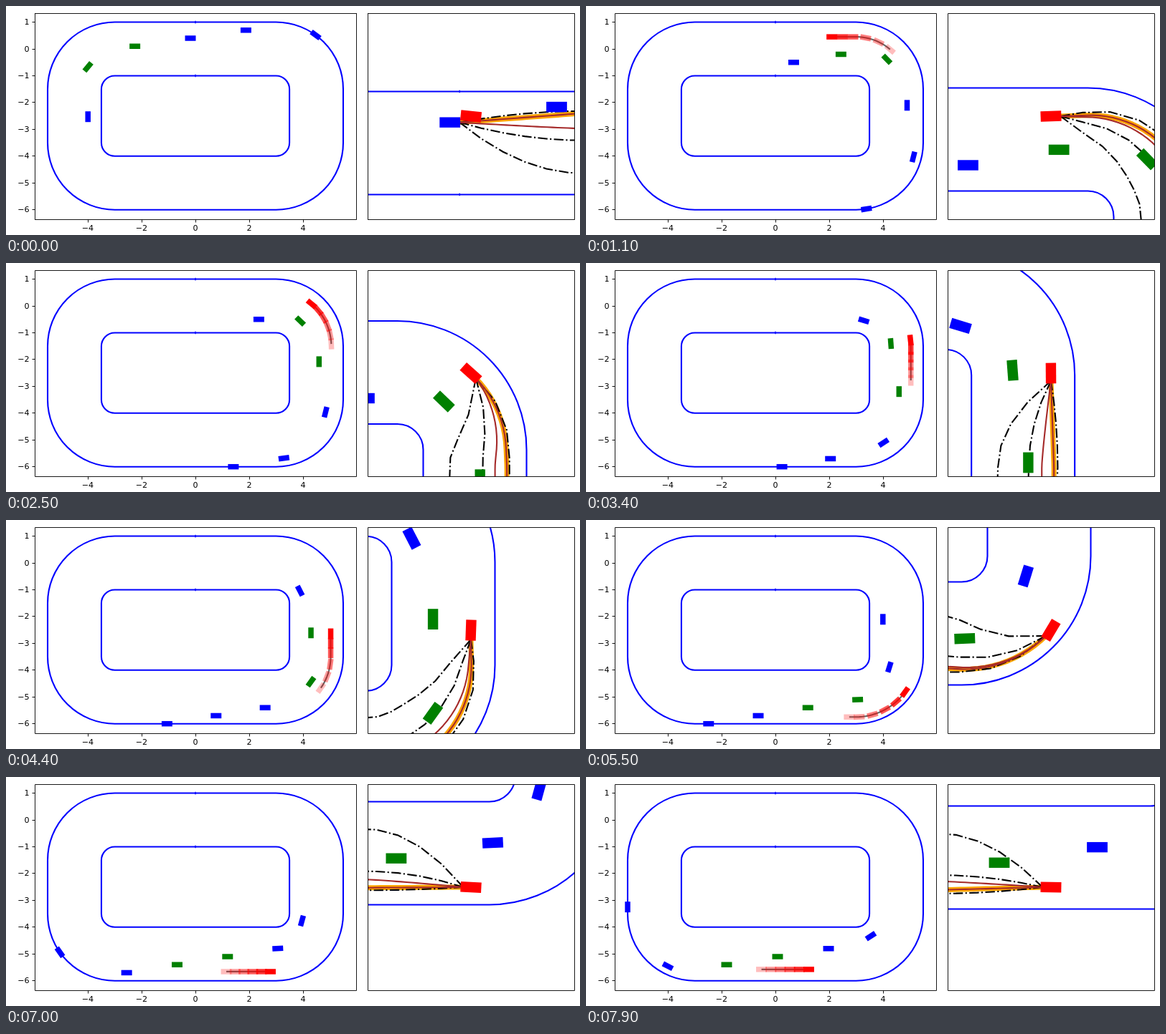
An HTML page with a canvas for the animation above (8000 ms loop, 800 by 320 pixels).

```html
<!DOCTYPE html>
<html lang="en">
<head>
<meta charset="utf-8">
<title>Track planner</title>
<style>
html, body { margin: 0; width: 800px; height: 320px; overflow: hidden; background: #fff; }
canvas { display: block; }
</style>
</head>
<body>
<canvas id="stage" width="800" height="320"></canvas>
<script>
const ctx = document.getElementById('stage').getContext('2d');
const QUARTER = Math.PI / 2, BEND = 1.5 * QUARTER, HALF = 8 + 2 * BEND;

// step, progress, lane offset, lag, plan length, tilt (deg), then five target offsets
const keys = [
  [0, .22, .52, .17, 2.09, -6, .62, .58, .28, .05, -.59],
  [11, 2.285, .451, .185, 1.96, 2, .66, .53, .39, .12, -.47],
  [25, 4.146, .558, .1, 1.25, 2, .67, .62, .39, .15, -.49],
  [44, 6.68, .535, .18, 1.77, -2, .68, .57, .37, .11, -.47],
  [55, 8.396, .748, .1, 1.67, 9, .75, .66, .62, .42, -.4],
  [70, 10.07, .66, .147, 1.64, -3, .72, .67, .51, .35, -.47],
  [79, 11.632, .576, .16, 1.76, -1, .7, .63, .46, .34, -.47]
];

// Smooth interpolation of every column at step k
function stateAt(k) {
  const last = keys.length - 1;
  let i = 0;
  while (i < last - 1 && keys[i + 1][0] <= k) i++;
  const a = keys[i], b = keys[i + 1], h = b[0] - a[0], u = (k - a[0]) / h;
  const slope = (j, c) => {
    const p = keys[Math.max(j - 1, 0)], n = keys[Math.min(j + 1, last)];
    return (n[c] - p[c]) / (n[0] - p[0]);
  };
  return a.map((v, c) => {
    const w = u * u * (3 - 2 * u);
    return v + (b[c] - v) * w
      + h * u * (1 - u) * ((1 - u) * slope(i, c) - u * slope(i + 1, c));
  });
}

// Progress s clockwise along the centre line, offset d outwards -> [x, y, heading]
function pose(s, d) {
  s = ((s % (2 * HALF)) + 2 * HALF) % (2 * HALF);
  if (s >= HALF) {
    const [x, y, a] = pose(s - HALF, d);
    return [-x, -5 - y, a + Math.PI];
  }
  const r = 1.5 + d;
  if (s < 3) return [s, d, 0];
  s -= 3;
  if (s < BEND) {
    const a = s / 1.5;
    return [3 + r * Math.sin(a), -1.5 + r * Math.cos(a), -a];
  }
  s -= BEND;
  if (s < 2) return [3 + r, -1.5 - s, -QUARTER];
  s -= 2;
  if (s < BEND) {
    const a = s / 1.5;
    return [3 + r * Math.cos(a), -3.5 - r * Math.sin(a), -QUARTER - a];
  }
  return [3 - (s - BEND), -5 - d, -Math.PI];
}

function view(ox, oy, scale, cx = 0, cy = 0) {
  const px = (x, y) => [ox + (x - cx) * scale, oy - (y - cy) * scale];

  function line(points, color, width, dash = []) {
    ctx.beginPath();
    points.forEach(p => ctx.lineTo(...px(p[0], p[1])));
    ctx.strokeStyle = color;
    ctx.lineWidth = width;
    ctx.lineJoin = 'round';
    ctx.setLineDash(dash);
    ctx.stroke();
    ctx.setLineDash([]);
  }

  function car([x, y, a], color, alpha = 1) {
    ctx.save();
    ctx.translate(...px(x, y));
    ctx.rotate(-a);
    ctx.globalAlpha = alpha;
    ctx.fillStyle = color;
    ctx.fillRect(-.2 * scale, -.1 * scale, .4 * scale, .2 * scale);
    ctx.restore();
  }

  function wall(w, top, h, r) {
    const [x, y] = px(-w, top);
    ctx.beginPath();
    ctx.roundRect(x, y, 2 * w * scale, h * scale, r * scale);
    ctx.strokeStyle = ctx.fillStyle = '#00f';
    ctx.lineWidth = 2.1;
    ctx.stroke();
    const [sx, sy] = px(0, top);
    ctx.fillRect(sx - .7, sy - 1.8, 1.4, 3.6);
  }

  function track() {
    wall(5.5, 1, 7, 2.5);
    wall(3.5, -1, 3, .5);
  }
  return { px, line, car, track };
}

function frame(x, y, w, h) {
  ctx.strokeStyle = '#000';
  ctx.lineWidth = .9;
  ctx.strokeRect(x, y, w, h);
}

const left = view(264, 60, 37.45);

function axes() {
  frame(40.5, 10.5, 448, 288);
  ctx.font = '11.1px "DejaVu Sans", sans-serif';
  ctx.fillStyle = '#000';
  const label = v => String(v).replace('-', '\u2212');
  const tick = (x, y, dx, dy) => {
    ctx.beginPath();
    ctx.moveTo(x, y);
    ctx.lineTo(x + dx, y + dy);
    ctx.stroke();
  };
  ctx.textAlign = 'center';
  for (let v = -4; v <= 4; v += 2) {
    const x = Math.round(left.px(v, 0)[0]) + .5;
    tick(x, 298.5, 0, 4);
    ctx.fillText(label(v), x - .5, 314);
  }
  ctx.textAlign = 'right';
  for (let v = -6; v <= 1; v++) {
    const y = Math.floor(left.px(0, v)[1]) + .5;
    tick(40.5, y, -4, 0);
    ctx.fillText(label(v), 32.5, y + 3.8);
  }
}

function rivals(k) {
  const n = k || 164; // the opening step still shows the end of the lap before
  return Array.from({ length: 6 }, (_, i) => ({
    at: pose(.68 + 1.76 * i + (n - 11) * (.12 + .002 * i), .3 * i - .5 - (i > 5)),
    color: i === 2 || i === (k < 50 ? 1 : 3) ? '#008000' : '#00f'
  }));
}

function draw(k) {
  const [, s, d, lag, length, tilt, ...targets] = stateAt(k);
  const cars = rivals(k);
  ctx.fillStyle = '#fff';
  ctx.fillRect(0, 0, 800, 320);

  left.track();
  cars.forEach(c => left.car(c.at, c.color));
  if (k) {
    const ahead = f => pose(s - lag + f * length, d);
    left.line(Array.from({ length: 21 }, (_, i) => ahead(i / 20)), '#666', 2.2);
    [1, .8, .65, .5, .38, .26].forEach((alpha, i) => left.car(ahead(i / 5), '#f00', alpha));
  }
  axes();

  ctx.save();
  ctx.beginPath();
  ctx.rect(504.5, 10.5, 288, 288);
  ctx.clip();
  const ego = pose(s, d);
  ego[2] += tilt * Math.PI / 180;
  const right = view(648, 154, 72, ego[0], ego[1]);
  right.track();

  const s0 = k ? s + lag : 0, d0 = k ? d : .4, reach = length * 1.15;
  const path = (target, power, step) => {
    const points = [];
    for (let u = 0; u < 3.4; u += step) {
      const rest = (1 - Math.min(u / reach, 1)) ** power;
      points.push(pose(s0 + u, target + (d0 - target) * rest));
    }
    return points;
  };
  const [outer, best, second, inner, far] = targets;
  const chosen = path(best, 1, .1);
  right.line(chosen, '#ffa500', 7);
  [outer, inner, far].forEach(t =>
    right.line(path(t, 2, .42), '#000', 2.1, [13.4, 3.4, 2.1, 3.4]));
  right.line(chosen, '#a52a2a', 2.1);
  right.line(path(second, 1.2, .1), '#a52a2a', 2.1);
  cars.forEach(c => right.car(c.at, c.color));
  right.car(ego, '#f00');
  ctx.restore();
  frame(504.5, 10.5, 288, 288);
}

function tick() {
  draw(Math.floor(performance.now() % 8000 / 100));
  requestAnimationFrame(tick);
}
tick();
</script>
</body>
</html>
```
